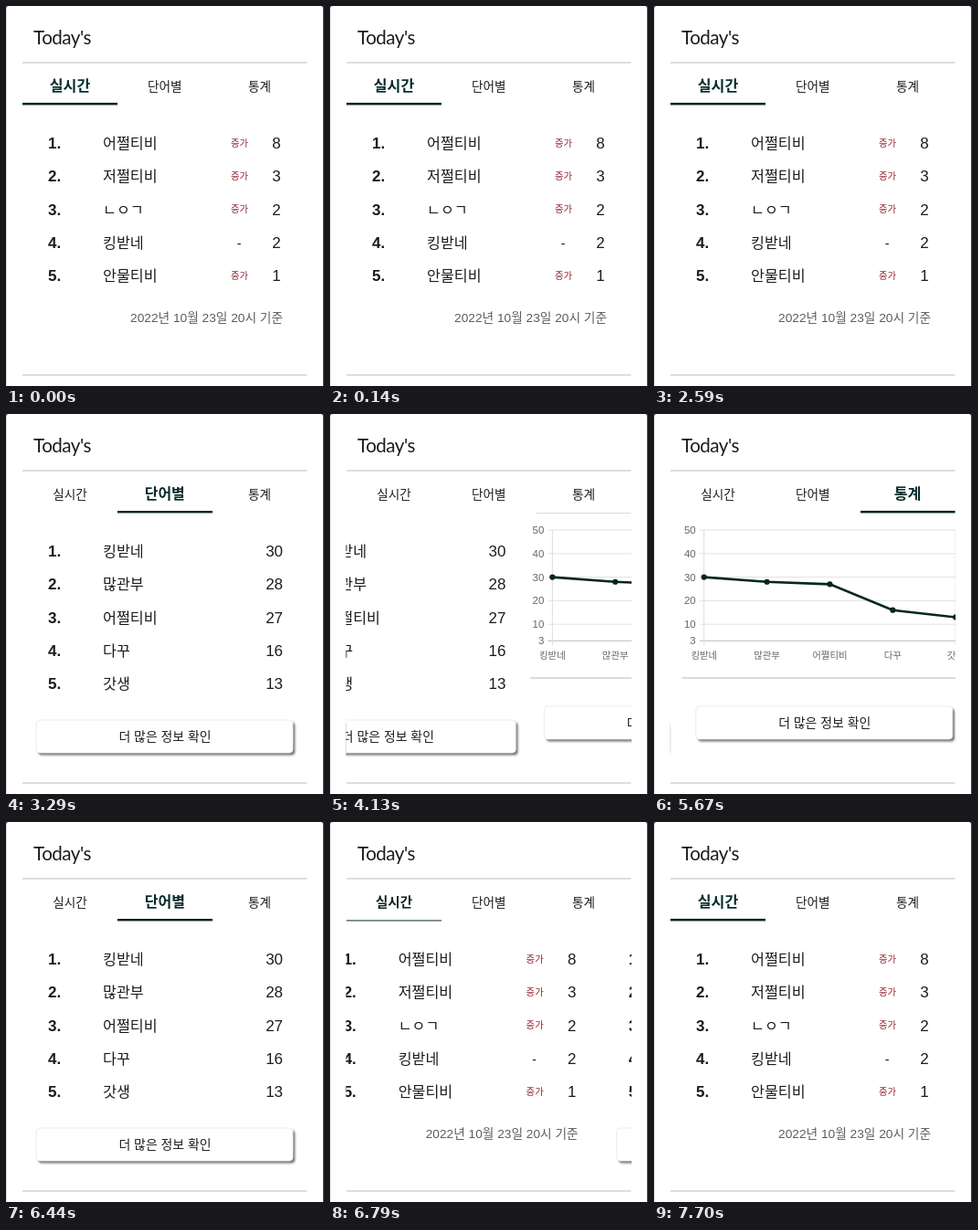
An HTML page that plays this animation: 348x416 px, repeating every 8 s.

```html
<!DOCTYPE html>
<html lang="ko">
<head>
<meta charset="utf-8">
<title>Today's</title>
<style>
  html, body { margin: 0; width: 100%; height: 100%; overflow: hidden; background: #fff; }
  svg { display: block; width: 100%; height: 100%; }
  text { font-family: "Liberation Sans", "Noto Sans CJK KR", "Noto Sans CJK", sans-serif; fill: #1c1c1c; }
  .ko { font-family: "Noto Sans CJK KR", "Noto Sans CJK", sans-serif; }
  .title { font: 20.6px Lato, sans-serif; letter-spacing: -.5px; }
</style>
</head>
<body>
<svg id="stage" viewBox="0 0 348 416">
  <defs>
    <clipPath id="view"><rect x="17.5" y="114" width="312.5" height="286"/></clipPath>
    <filter id="soft" x="-5%" y="-30%" width="110%" height="160%"><feGaussianBlur stdDeviation="1"/></filter>
  </defs>
  <rect width="348" height="416" fill="#333"/>
  <rect x=".15" width="346.85" height="430" rx="2.5" fill="#fff"/>
  <text class="title" x="30" y="42">Today's</text>
  <path d="M18 62H329.5M18 404H329.5" stroke="#bdbdbd"/>
  <g id="tabs"></g>
  <g clip-path="url(#view)"><g id="track"></g></g>
</svg>
<script>
const LOOP = 8000, PANE = 312, SLIDE = 500, GROW = 1000;
const GREEN = [4, 42, 42], INK = [28, 28, 28];

// Each move: slide start, tab switch, pane left, pane entered
const MOVES = [
  [2595, 2600, 0, 1],
  [4018, 4055, 1, 2],
  [5642, 5690, 2, 1],
  [6480, 6550, 1, 0]
];

const $ = id => document.getElementById(id);

function add(parent, tag, attrs, content) {
  const el = document.createElementNS('http://www.w3.org/2000/svg', tag);
  for (const k in attrs) el.setAttribute(k, attrs[k]);
  if (content !== undefined) el.textContent = content;
  parent.appendChild(el);
  return el;
}

function label(parent, x, y, size, content, attrs) {
  return add(parent, 'text', { x, y, 'font-size': size, ...attrs }, content);
}

const mid = { 'text-anchor': 'middle' };
const midKo = { ...mid, class: 'ko' };

function pane(i) {
  return add($('track'), 'g', { transform: `translate(${i * PANE} 0)` });
}

function rank(g, i, word, count, countX) {
  const y = 156.2 + i * 36.25;
  label(g, 46, y, 17, i + 1 + '.', { 'font-weight': 700 });
  label(g, 106, y, 16.2, word, { class: 'ko' });
  label(g, countX, y, 17, count, mid);
  return y;
}

function button(g, y) {
  const box = { x: 33, width: 281, height: 36, rx: 4 };
  add(g, 'rect', { ...box, y: y + 2.5, transform: 'translate(2.3 0)', fill: '#777', filter: 'url(#soft)' });
  add(g, 'rect', { ...box, y, fill: '#fff', stroke: '#e4e4e4', 'stroke-width': .7 });
  label(g, 174, y + 23, 13.9, '더 많은 정보 확인', midKo);
}

function livePane() {
  const g = pane(0);
  const rows = [['어쩔티비', 8], ['저쩔티비', 3], ['ㄴㅇㄱ', 2], ['킹받네', 2], ['안물티비', 1]];
  rows.forEach(([word, n], i) => {
    const y = rank(g, i, word, n, 296);
    if (i === 3) label(g, 255, y, 14, '-', mid);
    else label(g, 255.5, y - 2.4, 10.4, '증가', { ...midKo, style: 'fill:#93222f' });
  });
  label(g, 303, 346, 13.7, '2022년 10월 23일 20시 기준',
    { 'text-anchor': 'end', style: 'fill:#5c5c5c' });
}

const WORDS = [['킹받네', 30], ['많관부', 28], ['어쩔티비', 27], ['다꾸', 16], ['갓생', 13]];

function wordPane() {
  const g = pane(1);
  WORDS.forEach(([word, n], i) => rank(g, i, word, n, 293.6));
  button(g, 335);
}

function chartPane() {
  const g = pane(2);
  const px = i => 42 + i * 68.85;
  const py = v => 127 + (50 - v) * 2.58;
  const grey = { style: 'fill:#666' };
  for (const v of [50, 40, 30, 20, 10, 3]) {
    add(g, 'path', { d: `M37 ${py(v)}H${px(4)}`, stroke: v === 3 ? '#bbb' : '#e2e2e2' });
    label(g, 33, py(v) + 4, 11.5, v, { ...grey, 'text-anchor': 'end' });
  }
  for (const i of [0, 4]) add(g, 'path', { d: `M${px(i)} 127V253`, stroke: '#dcdcdc' });
  const pts = WORDS.map(([, v], i) => [px(i), py(v)]);
  add(g, 'polyline', { points: pts.join(' '), fill: 'none', stroke: '#04261f', 'stroke-width': 2.6 });
  pts.forEach(([cx, cy], i) => {
    add(g, 'circle', { cx, cy, r: 3.1, fill: '#04261f' });
    label(g, cx, 268, 10.4, WORDS[i][0], { ...midKo, ...grey });
  });
  add(g, 'path', { d: 'M18 289H330', stroke: '#b8b8b8' });
  button(g, 320);
}

livePane();
wordPane();
chartPane();

const tabs = ['실시간', '단어별', '통계'].map((name, i) => ({
  text: label($('tabs'), 70 + i * 103.8, 93, 13.6, name, midKo),
  bar: add($('tabs'), 'rect', { x: 18 + i * 104, width: i < 2 ? 104 : 103.5, fill: '#06201f' })
}));

// cubic-bezier(.25, .1, .25, 1)
function ease(p) {
  if (p <= 0) return 0;
  if (p >= 1) return 1;
  let lo = 0, hi = 1;
  const curve = (a, b, u) => 3 * a * u * (1 - u) ** 2 + 3 * b * u * u * (1 - u) + u ** 3;
  for (let k = 0; k < 24; k++) {
    const u = (lo + hi) / 2;
    if (curve(.25, .25, u) < p) lo = u; else hi = u;
  }
  return curve(.1, 1, lo);
}

function draw(t) {
  let pos = 0, active = 0, grown = 1;
  for (const [slideAt, tabAt, from, to] of MOVES) {
    if (t >= slideAt) pos = from + (to - from) * ease((t - slideAt) / SLIDE);
    if (t >= tabAt) {
      active = to;
      grown = ease((t - tabAt) / GROW);
    }
  }
  $('track').setAttribute('transform', `translate(${-pos * PANE} 0)`);
  tabs.forEach(({ text, bar }, i) => {
    const k = i === active ? grown : 0;
    const color = INK.map((c, j) => Math.round(c + (GREEN[j] - c) * k));
    text.setAttribute('font-size', 13.6 + 2.5 * k);
    text.setAttribute('y', 93 + .4 * k);
    text.setAttribute('font-weight', k > .34 ? 700 : 400);
    text.style.fill = `rgb(${color})`;
    bar.setAttribute('y', 108.4 - 2.5 * k);
    bar.setAttribute('height', 2.5 * k);
  });
}

const start = performance.now();
function tick() {
  draw((performance.now() - start) % LOOP);
  requestAnimationFrame(tick);
}
draw(0);
requestAnimationFrame(tick);
</script>
</body>
</html>
```
